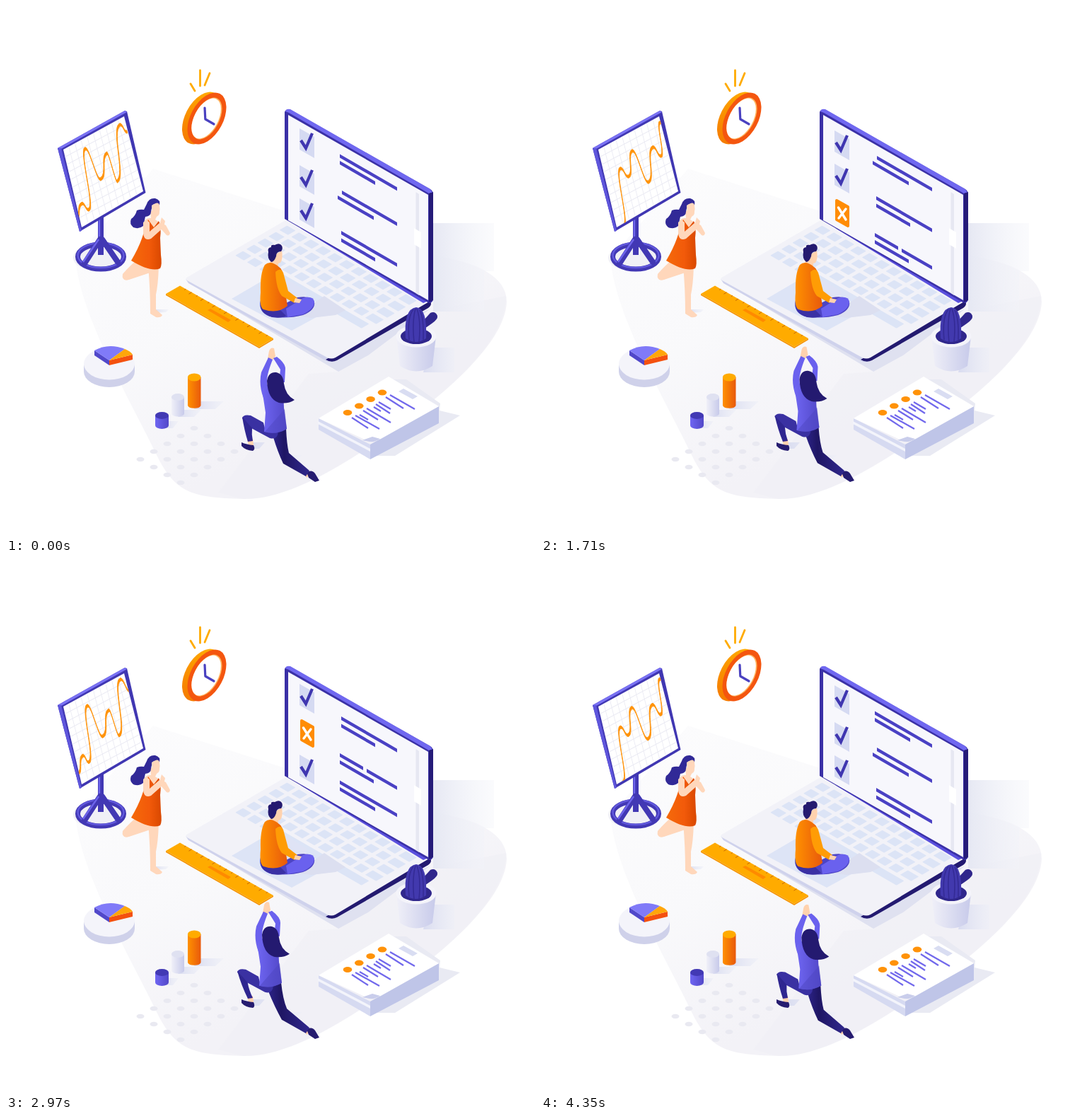
These frames come from a looping animation (748 px wide and 748 px high, 4.41 s). An HTML page:

```html
<!DOCTYPE html>
<html lang="en">
<head>
<meta charset="utf-8">
<title>Calm workspace</title>
<style>
html, body { margin: 0; width: 100%; height: 100%; overflow: hidden; background: #fff; }
svg { display: block; width: 100%; height: 100%; }
</style>
</head>
<body>
<svg viewBox="0 0 748 748">
<defs>
  <linearGradient id="floor" x1=".1" y1="0" x2=".6" y2=".75"><stop stop-color="#fcfcfd"/><stop offset=".55" stop-color="#f9f9fb"/><stop offset="1" stop-color="#f3f2f7"/></linearGradient>
  <linearGradient id="shade"><stop stop-color="#d9dcf0"/><stop offset="1" stop-color="#eceef7" stop-opacity=".5"/></linearGradient>
  <linearGradient id="haze"><stop stop-color="#e6e8f3"/><stop offset="1" stop-color="#f4f5fa" stop-opacity=".4"/></linearGradient>
  <linearGradient id="orange"><stop stop-color="#ff9100"/><stop offset="1" stop-color="#e8590c"/></linearGradient>
  <linearGradient id="dress"><stop stop-color="#f56a0a"/><stop offset=".6" stop-color="#f25a0a"/><stop offset="1" stop-color="#d94800"/></linearGradient>
  <linearGradient id="violet"><stop stop-color="#6f66f2"/><stop offset="1" stop-color="#5248c8"/></linearGradient>
  <linearGradient id="navy"><stop stop-color="#2f2690"/><stop offset=".35" stop-color="#1f1664"/><stop offset="1" stop-color="#30278c"/></linearGradient>
  <linearGradient id="pale"><stop stop-color="#f0f0f8"/><stop offset="1" stop-color="#c7caea"/></linearGradient>
  <linearGradient id="rim" x2="0" y2="1"><stop stop-color="#ffab00"/><stop offset="1" stop-color="#f57c00"/></linearGradient>
  <clipPath id="boardClip"><path d="M81 203L167 156 194 262 107 313z"/></clipPath>
  <clipPath id="screenClip"><path d="M399 153L597 266V417L399 303z"/></clipPath>
</defs>

<!-- floor -->
<path fill="url(#floor)" d="M208 230L410 295 604 353C670 362 709 385 708 419 705 480 610 560 515 622 440 673 380 698 335 697 265 695 240 690 213 635 180 565 105 440 98 357z"/>
<path fill="#efeff5" opacity=".5" d="M300 688L428 520 470 517 604 430 707 410C707 480 610 560 515 622 440 673 380 698 335 697z"/>
<path fill="url(#haze)" d="M604 307H690V375H676V432H604z"/>
<g id="dots" fill="#e9e9f1"></g>

<!-- clock -->
<g fill="none" stroke="#ffab00" stroke-width="2.8" stroke-linecap="round"><path d="M261 110L267 120M274.500 91V113M288 95L281 112"/></g>
<g transform="translate(277 158.500) rotate(28)"><ellipse rx="23.500" ry="40" fill="url(#rim)"/></g>
<g transform="translate(284 159) rotate(28)"><ellipse rx="23" ry="39.500" fill="#f4560f"/><ellipse rx="17.500" ry="32" fill="#ffb45e"/><ellipse cx="-.8" cy=".5" rx="16.800" ry="31" fill="#fff"/></g>
<path d="M281 144L281.800 160 294 167" fill="none" stroke="#4a41c0" stroke-width="3.200" stroke-linecap="round" stroke-linejoin="round"/>

<!-- easel -->
<ellipse cx="132" cy="356" rx="37" ry="19" fill="#f0f0f6"/>
<g fill="none" stroke="#4238b4">
  <ellipse cx="134" cy="354.500" rx="32.500" ry="17.500" stroke-width="7"/>
  <ellipse cx="134" cy="352.500" rx="32.500" ry="17.500" stroke="#6158dc" stroke-width="2.500"/>
  <path d="M134 298V352" stroke-width="8"/><path d="M132 298V328" stroke="#6d64ea" stroke-width="2.500"/>
  <path d="M133 330L111 364M136 330L158 362" stroke-width="8" stroke-linecap="round"/>
  <path d="M131 330L109 362" stroke="#6d64ea" stroke-width="2.500"/>
</g>
<path fill="#4037b2" d="M73 201L168 148 171 149 197.500 264 104 319z"/>
<path fill="#7a72f4" d="M73 201L168 148 171 150 78 202z"/>
<path fill="#5f56dc" d="M73 201L78 201 107 318 104 319z"/>
<path fill="#fff" d="M81 203L167 156 194 262 107 313z"/>
<g clip-path="url(#boardClip)"><g transform="matrix(87 -46 27 107 80 203)">
  <path id="grid" fill="none" stroke="#eaeaf3" stroke-width=".009"/>
  <path id="curve" fill="#ff930a" stroke="#ff930a" stroke-width=".008" stroke-linejoin="round"/>
</g></g>

<!-- laptop base -->
<path fill="#dfe1f0" d="M258 391L470 517 512 494 600 428 461 490z"/>
<path fill="#cfd2ec" d="M254 386L258 392 455 503 462 503 461 496z"/>
<path fill="#231a70" d="M452 500Q460 505 468 501L597 427Q603 423 600 417L461 495z"/>
<path fill="#f2f2f8" d="M397 302L598 418 466 497Q460 500 454 497L256 388Q252 386 257 383z"/>
<path fill="#5a50de" d="M416 314L424 316 597 417 590 420z"/>
<g id="keys" transform="matrix(.866 .5 -.866 .5 400 307)" fill="#dce4f6"></g>
<path fill="#dde4f6" d="M319 414L360 390 448 435 404 459z"/>

<!-- laptop screen -->
<path fill="#3a30a6" d="M394 150Q395 146 401 146L600 259Q604 262 604 266V415Q603 420 598 420L394 301z"/>
<path fill="#7068f0" d="M395 149Q396 145 402 146L600 259 603 264 598 265 400 151z"/>
<path fill="#251b78" d="M598 265L604 263V416L598 419z"/>
<path fill="#f7f7fc" d="M399 154L597 267V416L399 303z"/>
<g clip-path="url(#screenClip)">
  <g id="list"></g>
  <path fill="#e6e7f2" d="M579.500 263L584 266V409L579.500 406z"/>
  <path fill="#fff" d="M577 314L587 320V343L577 337z"/>
</g>

<!-- seated man -->
<path fill="#dcdff0" d="M410 438L450 410 480 430 466 437 432 441z"/>
<path fill="#dfe3f5" d="M393 391L400 388 425 404 420 416 404 413z"/>
<path fill="#4d44c4" d="M360 416Q356 433 373 439 398 443 420 437 438 430 436 418 432 409 412 412L384 426z"/>
<path fill="#3a30a4" d="M360 417Q357 434 376 440 390 442 396 438L384 426z"/>
<path fill="#6a61ee" d="M396 428L420 413Q434 409 436 418 436 428 420 436L398 440z"/>
<path fill="#ffd2ae" d="M374 355L390 346Q392 357 388 363L385 364 385 372 373 367z"/>
<path fill="#241a70" d="M371 348Q369 342 375 341 374 337 380 338 387 334 390 339 392 343 389 347 382 347 382 354 379 362 375 362 369 357 371 348z"/>
<path fill="url(#orange)" d="M366 366Q374 359 386 369 392 372 392 386L398 424Q384 436 364 429 358 426 360 405 359 378 366 366z"/>
<path fill="#ff9c05" d="M381 376Q388 369 392 377L399 403 412 413 408 420 390 410Q382 400 381 376z"/>
<path fill="#ffd2ae" d="M409 413L418 415 415 420 407 419z"/>

<!-- standing woman -->
<path fill="url(#shade)" d="M207 429H230L226 433 208 434z"/>
<g fill="#ffd7bb">
  <path d="M188 357Q176 366 165 379 163 390 174 387L204 377 208 366z"/>
  <path d="M201 368H216Q215 395 212 408L212 429 221 437Q219 441 212 440L204 435Q204 400 201 368z"/>
  <path d="M196 303Q201 299 205 300L204 290 216 287Q219 295 213 298L211 302 217 306 215 325 199 325z"/>
</g>
<path fill="#312997" d="M199 280Q202 271 211 272 219 274 217 282L209 280Q206 284 205 291 205 297 197 298L194 311Q188 316 180 313 174 308 177 301 183 297 185 289 190 287 195 288z"/>
<path fill="#ffd7bb" d="M206 282Q216 275 217 282 219 292 213 296 206 296 206 282z"/>
<path fill="url(#dress)" d="M201 302L209 313 216 304Q220 312 218 328L219 352Q221 366 218 371 205 377 177 360 187 343 192 329z"/>
<path fill="#ffd7bb" d="M194 306Q199 301 203 306L203 319 218 306 220 299 225 304 223 313 205 329Q195 333 194 321zM222 308L226 310 232 321Q231 326 227 324L219 315z"/>

<!-- ruler -->
<path fill="#f59200" d="M226 407L358 482 378 470V472L358 484 226 409z"/>
<path fill="#ffab00" d="M226 407L246 395.500 378 470 358 482z"/>
<path fill="#ff8a00" d="M285 430L289 428 318 444 314 447z"/>
<path id="ticks" stroke="#c86400" stroke-width="1" fill="none"/>

<!-- pie chart -->
<path fill="#cfd1ea" d="M110 506V517A36 22 0 0 0 182 517V506z"/>
<ellipse cx="146" cy="506" rx="36" ry="22.500" fill="#f4f4fa"/>
<path fill="#5148ca" d="M125 487L146 501V508L125 494z"/>
<path fill="#f4510f" d="M146 501L179 493V500L146 508z"/>
<path fill="#807af8" d="M125 487Q145 476 168 485L146 501z"/>
<path fill="#ffa60a" d="M146 501L168 485Q176 488 179 493z"/>

<!-- cylinders -->
<g fill="url(#shade)"><path d="M272 559H308L296 570H266z"/><path d="M250 571H276L266 581H243z"/><path d="M228 587H244L236 597H220z"/></g>
<path fill="url(#violet)" d="M211 579V593A9.500 5 0 0 0 230 593V579z"/><ellipse cx="220.500" cy="579" rx="9.500" ry="5" fill="#4239b4"/>
<path fill="url(#pale)" d="M234 553V577A9.500 5 0 0 0 252 577V553z"/><ellipse cx="243" cy="553" rx="9" ry="5" fill="#dfe1f1"/>
<path fill="url(#orange)" d="M257 525V565A9.500 5 0 0 0 275.500 565V525z"/><ellipse cx="266.200" cy="525" rx="9.300" ry="5.500" fill="#ffab00"/>

<!-- cactus -->
<path fill="url(#shade)" d="M600 483H634V518H590z"/>
<path fill="url(#pale)" d="M552 467L557 509Q580 524 603 509L608 467z"/>
<ellipse cx="580" cy="467" rx="28.500" ry="15.500" fill="#f4f4fa"/>
<ellipse cx="580" cy="467" rx="22" ry="11" fill="#30278c"/>
<path fill="#30278c" d="M590 445L600 434Q607 431 610 438 611 443 602 449L592 456z"/>
<path fill="#4239ae" d="M565 470Q562 428 580 426 596 427 594 470 580 480 565 470z"/>
<path fill="none" stroke="#332a94" stroke-width="1.500" d="M570 472Q567 440 576 429M577 475Q574 445 579 428M584 475Q587 445 581 428M590 472Q591 440 585 430"/>

<!-- papers -->
<path fill="#e9eaf3" d="M548 528H566L614 562 613 572 642 579 550 636H520z"/>
<path fill="#d6daf1" d="M442 583L515 620V641L442 599z"/>
<path fill="#bfc5e8" d="M515 620L612 566V590L515 641z"/>
<path fill="#f3f4fb" d="M441 587L515 626V630L441 591z"/>
<path fill="#fff" d="M442 583L541 524 612 566 530 612Q520 617 514 616z"/>
<path fill="#c9cdeb" d="M504 614L518 609 529 612Q522 617 514 616z"/>
<path fill="#d9ddf2" d="M555 545L562 541 582 552 575 556z"/>
<g fill="#ff9208"><ellipse cx="483" cy="575" rx="6.300" ry="4"/><ellipse cx="499.300" cy="565.500" rx="6.300" ry="4"/><ellipse cx="515.600" cy="556" rx="6.300" ry="4"/><ellipse cx="532" cy="546.500" rx="6.300" ry="4"/></g>
<path fill="none" stroke="#7168ec" stroke-width="2.200" d="M489 582L512 597M494 579L528 598M505 572L526 585M510 569L544 589M523 563L543 576M527 560L544 570M537 553L562 569M543 550L578 570M500 578L512 585M520 567L530 573"/>

<!-- stretching woman -->
<path fill="url(#shade)" d="M396 635H418L408 645H396zM345 617H366L358 626H346z"/>
<g fill="#ffd2ae"><path d="M341 613L349 612 350 621 343 622z"/><path d="M418 656L426 656 431 662 425 667z"/></g>
<path fill="#261c70" d="M333 617Q340 620 350 621 353 627 349 629 338 628 333 622zM425 659Q433 655 437 661L443 671 437 673 428 667z"/>
<path id="backLeg" fill="url(#navy)"/>
<path id="frontLeg" fill="#3a31a2"/>
<path id="shin" fill="#2f2690"/>
<g id="torso">
  <path fill="#ffd2ae" d="M372 488Q374 482 379 484L381 495 378 500 370 499z"/>
  <path fill="#6a61ee" d="M371 497L377 500Q369 520 369 530L370 548 364 554Q357 535 361 518zM378 498L383 496Q395 505 395 513L394 532 386 532 388 514z"/>
  <path fill="url(#violet)" d="M362 542L370 535 392 545 393 568 397 598Q382 607 365 602L367 575z"/>
  <path fill="#4f46c2" opacity=".5" d="M366 602L394 570 397 598Q382 607 366 602z"/>
  <path fill="#241a70" d="M369 530Q371 517 382 518 392 520 393 534 395 550 408 557 399 563 386 561 370 556 369 530z"/>
</g>
</svg>
<script>
const $ = id => document.getElementById(id);
const LOOP = 4410;

// Static repeats
let dots = "", keys = "", grid = "", ticks = "";
for (let i = 0; i < 5; i++)
  for (let j = 0; j < 4; j++)
    dots += `<ellipse cx="${266 - 19 * i + 19 * j}" cy="${597 + 11 * (i + j)}" rx="5.500" ry="3.300"/>`;
const key = (x, y, w) => `<rect x="${x}" y="${y}" width="${w}" height="12.500" rx="1"/>`;
for (let r = 0; r < 4; r++)
  for (let c = 0; c < 11; c++) keys += key(2 + c * 19.400, 5 + r * 18, 14 + (c == 10 ? 4 : 0));
for (const [x, w] of [[2, 14], [21, 14], [41, 14], [61, 74], [139, 14], [158, 50]]) keys += key(x, 77, w);
for (let i = 1; i < 10; i++) grid += `M${i / 10} 0V1M0 ${i / 10}H1`;
for (let i = 1; i < 16; i++) ticks += `M${246 + i * 8.250} ${395.5 + i * 4.660}l${i % 2 ? "-2 1.2" : "-4 2.4"}`;
$("dots").innerHTML = dots;
$("keys").innerHTML = keys;
$("grid").setAttribute("d", grid);
$("ticks").setAttribute("d", ticks);

// Checklist: box centre, crossed, bars as [x1, x2, offset]
const CYCLE = 199;
const items = [
  [193, 0, [[472, 553, 16.5], [472, 522, 26]]],
  [245, 0, [[475, 553, 16], [469, 520, 23]]],
  [292, 0, [[474, 553, 26], [474, 522, 36.5]]],
  [342, 1, [[472, 505, 28], [510, 553, 50], [472, 520, 38]]]
];
const bar = ([x1, x2, y]) => {
  const d = (x2 - x1) * .578;
  return `<path fill="#4a41c4" d="M${x1} ${y}L${x2} ${y + d}v5L${x1} ${y + 5}z"/>`;
};
const box = crossed => crossed
  ? `<path fill="#ff8c05" stroke="#ff8c05" stroke-width="4" stroke-linejoin="round" d="M418 -18L434 -9V18L418 9z"/>
     <path stroke="#fff" stroke-width="3.400" stroke-linecap="round" d="M420.500 -8L431 9M431 -6L421 7"/>`
  : `<path fill="#d5daf2" d="M415 -20L436 -8V22L415 10z"/>
     <path fill="none" stroke="#3f36b0" stroke-width="4.200" d="M417 -3L424 8 433 -13"/>`;
$("list").innerHTML = [0, CYCLE].map(shift => items.map(([y, crossed, bars]) =>
  `<g transform="translate(0 ${y + shift})">${box(crossed)}${bars.map(bar).join("")}</g>`).join("")).join("");

const ease = (t, from, to) => {
  const p = Math.min(1, Math.max(0, (t - from) / (to - from)));
  return (1 - Math.cos(Math.PI * p)) / 2;
};

// Routes followed by the crests and dips of the curve, three stops per cycle
const crests = [[.08, .75], [.184, .593], [.255, .362], [.327, .13], [.418, .17], [.492, .23],
  [.626, .316], [.707, .35], [.8, .315], [.911, .065], [.957, -.01], [.99, .07], [1.05, .1]];
const dips = [[-.06, .9], [.05, .84], [.1, 1.05], [.16, .862], [.206, .705], [.349, .505],
  [.44, .58], [.519, .625], [.612, .693], [.666, .707], [.777, .643], [.89, .467],
  [.99, .19], [1.08, .3], [1.15, .4], [1.2, .5]];
const along = (route, k) => {
  const i = Math.floor(k), f = k - i, a = route[i], b = route[i + 1];
  return [a[0] + (b[0] - a[0]) * f, a[1] + (b[1] - a[1]) * f];
};
// Smooth wave through the turning points, shifted up or down by off
const edge = (pts, off) => pts.map(([x, y], i) => {
  if (!i) return `${x} ${y + off}`;
  const [px, py] = pts[i - 1], reach = (x - px) * .6;
  return `C${px + reach} ${py + off} ${x - reach} ${y + off} ${x} ${y + off}`;
}).join("");

function drawCurve(t) {
  const p = t % 2720 / 2720;
  const k = p < .276 ? p / .276 : p < .629 ? 1 + (p - .276) / .353 : 2 + (p - .629) / .371;
  const pts = [];
  for (let n = 0; n < 5; n++) {
    pts.push(along(dips, k + 3 * n));
    if (n < 4) pts.push(along(crests, k + 3 * n));
  }
  $("curve").setAttribute("d", "M" + edge(pts, -.019) + "L" + edge(pts.reverse(), .019) + "z");
}

function drawLunge(t) {
  const p = t % 2470, k = ease(p, 0, 600) - ease(p, 1400, 2000);
  const x = -7.500 * k, y = -4.500 * k;
  const at = (px, py, w = 1) => `${px + x * w} ${py + y * w} `;
  $("torso").setAttribute("transform", `translate(${x} ${y})`);
  $("backLeg").setAttribute("d", `M${at(374, 600)}L${at(396, 597)}Q${at(397, 620, .8)}${at(400, 632, .4)}L429 657 424 665 ${at(392, 647, .3)}Q${at(384, 630, .6)}${at(378, 610)}z`);
  $("frontLeg").setAttribute("d", `M${at(334, 583)}Q${at(335, 577)}${at(346, 579)}L${at(364, 589)}${at(367, 601)}${at(385, 602)}Q${at(384, 614)}${at(373, 611)}L${at(347, 597)}z`);
  $("shin").setAttribute("d", `M${at(334, 581)}L${at(348, 597, .9)}Q${at(347, 606, .5)}349 615L342 616Q${at(337, 600, .6)}${at(334, 581)}z`);
}

function frame() {
  const t = performance.now() % LOOP;
  const scroll = 49 * ease(t, 590, 1110) + 52 * ease(t, 1960, 2470) + 98 * ease(t, 3340, 3905);
  $("list").setAttribute("transform", `translate(0 ${-scroll})`);
  drawCurve(t);
  drawLunge(t);
  requestAnimationFrame(frame);
}
frame();
</script>
</body>
</html>
```
